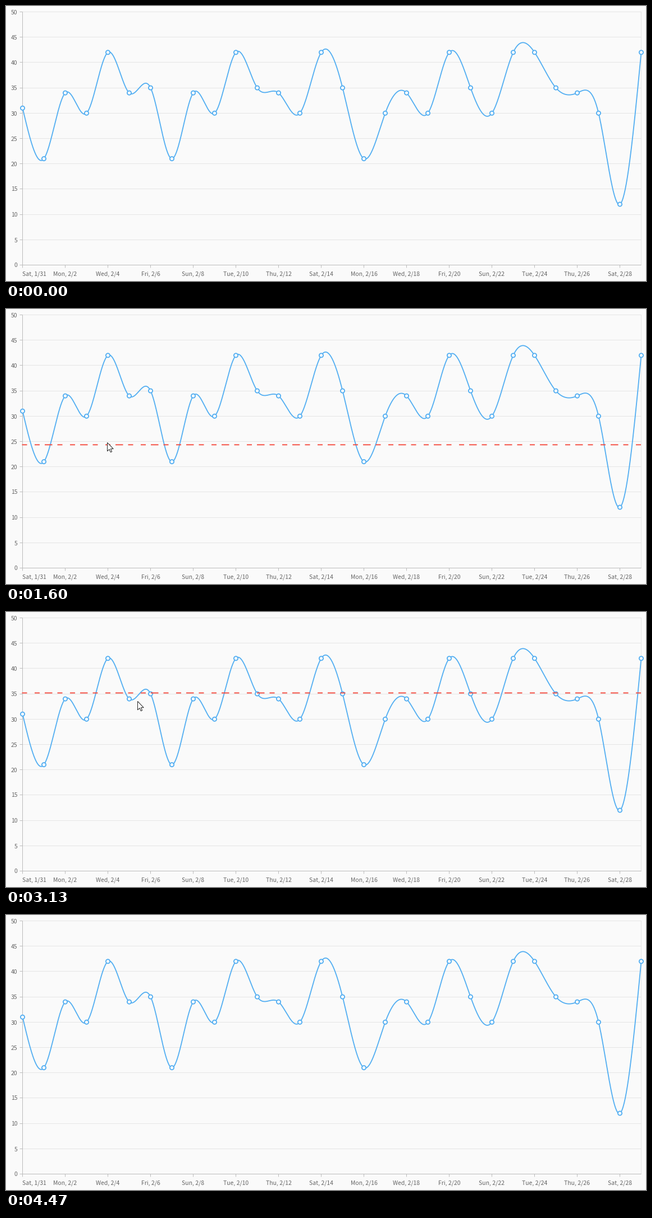
Recreate the animation shown at these times as a matplotlib script. Size 1140 px wide and 491 px high, loop 4790 ms.

```python
import numpy as np
import matplotlib.pyplot as plt
from matplotlib.animation import FuncAnimation

plt.rcParams["path.snap"] = False

W, H, DPI = 1140, 491, 64
PX = 72 / DPI  # points per pixel
FRAMES, LOOP_MS = 72, 4790

LEFT, RIGHT, TOP, BOTTOM = 29.5, 1131.5, 10.5, 462.5
STEP = 38
BG, GRID, AXIS, TEXT = "#fafafa", "#e5e5e5", "#bcbcbc", "#666666"
BLUE, RED = "#52aef2", "#f44336"

# one reading per day
VALUES = np.array([31, 21, 34, 30, 42, 34, 35, 21, 34, 30, 42, 35, 34, 30, 42,
                   35, 21, 30, 34, 30, 42, 35, 30, 42, 42, 35, 34, 30, 12, 42])

# pointer path: frame, x, y; it rises, rests at the top and leaves downwards
ENTER, LEAVE = 8, 67
KEYS = np.array([(8, 42, 484), (16, 102, 393), (24, 180, 238), (32, 226, 132),
                 (39, 250, 50), (41, 250, 50), (44, 246, 80), (47, 234, 159),
                 (49, 230, 235), (57, 186, 394), (66, 62, 482)], float)
DRAG = 0.015  # how far the dashed line trails, per squared speed

ARROW = np.array([(0, 0), (0, 15.4), (3.5, 12), (5.8, 17.2), (8.1, 16.2),
                  (5.9, 11.2), (10.7, 11.2)]) + 0.5


def hermite(t, ts, ps, slopes):
    i = np.clip(np.searchsorted(ts, t, side="right") - 1, 0, len(ts) - 2)
    h = ts[i + 1] - ts[i]
    u = (t - ts[i]) / h
    return ((1 + 2 * u) * (1 - u) ** 2 * ps[i]
            + u * (1 - u) ** 2 * h * slopes[i]
            + u * u * (3 - 2 * u) * ps[i + 1]
            - u * u * (1 - u) * h * slopes[i + 1])


def natural_slopes(ps):
    """Slopes of a natural cubic spline on unit spacing."""
    n = len(ps)
    a = 4 * np.eye(n) + np.eye(n, k=1) + np.eye(n, k=-1)
    a[0, 0] = a[-1, -1] = 2
    padded = np.pad(ps, 1, mode="edge")
    return np.linalg.solve(a, 3 * (padded[2:] - padded[:-2]))


def track(t, ts, ps):
    """Smooth path through the keys that never overshoots them."""
    d = np.diff(ps) / np.diff(ts)
    product = d[:-1] * d[1:]
    total = np.where(product > 0, d[:-1] + d[1:], 1)
    inner = np.where(product > 0, 2 * product / total, 0)
    slopes = np.concatenate([d[:1], inner, d[-1:]])
    return hermite(np.clip(t, ts[0], ts[-1]), ts, ps, slopes)


def to_y(value):
    return BOTTOM - value * (BOTTOM - TOP) / 50


fig = plt.figure(figsize=(W / DPI, H / DPI), dpi=DPI, facecolor=BG)
ax = fig.add_axes([0, 0, 1, 1])
ax.set_xlim(0, W)
ax.set_ylim(H, 0)
ax.axis("off")


def segment(x0, y0, x1, y1, color):
    ax.plot([x0, x1], [y0, y1], color=color, lw=PX,
            solid_capstyle="butt", zorder=1)


def label(x, y, text, align):
    ax.text(x, y, text, ha=align, va="baseline", color=TEXT,
            family="Noto Sans CJK JP", size=10.4 * PX)


# grid, axes and labels
for value in range(0, 51, 5):
    y = np.floor(to_y(value)) + 0.5
    segment(LEFT, y, RIGHT, y, GRID)
    segment(LEFT - 5, y, LEFT, y, AXIS)
    label(20.5, y + 4, str(value), "right")
segment(RIGHT, TOP, RIGHT, BOTTOM, GRID)
segment(LEFT, TOP, LEFT, BOTTOM, AXIS)
segment(LEFT, BOTTOM, RIGHT, BOTTOM, AXIS)

DAYS = ["Sat", "Mon", "Wed", "Fri", "Sun", "Tue", "Thu"]
for i in range(15):
    x = LEFT + 2 * i * STEP
    segment(x, BOTTOM, x, BOTTOM + 5, AXIS)
    date = f"2/{2 * i}" if i else "1/31"
    label(x if i else x - 0.6, 482, f"{DAYS[i % 7]}, {date}",
          "center" if i else "left")

# data series
index = np.arange(len(VALUES))
fine = np.linspace(0, index[-1], 1200)
curve = hermite(fine, index, VALUES, natural_slopes(VALUES))
ax.plot(LEFT + fine * STEP, to_y(curve), color=BLUE, lw=1.8 * PX, zorder=2)
for i, value in enumerate(VALUES):
    ax.add_patch(plt.Circle((LEFT + i * STEP, to_y(value)), 3.6, fc="#fdfdfd",
                            ec=BLUE, lw=1.8 * PX, zorder=3))

# moving parts
marker, = ax.plot([28.5, RIGHT], [0, 0], color=RED, lw=1.8 * PX, zorder=4,
                  ls=(0, (5, 7.5, 5, 5, 7.5, 5)))
pointer = plt.Polygon(ARROW, closed=True, fc="white", ec="#1c1c1c",
                      lw=0.95 * PX, joinstyle="miter", zorder=5)
ax.add_patch(pointer)


def update(k):
    times, xs, ys = KEYS.T
    x, y = track(k, times, xs), track(k, times, ys)
    speed = y - track(k - 1, times, ys)
    line_y = y - DRAG * speed * abs(speed)
    inside = ENTER <= k < LEAVE
    marker.set_ydata([line_y, line_y])
    marker.set_visible(bool(inside and line_y < BOTTOM))
    pointer.set_xy(ARROW + [x, y])
    pointer.set_visible(inside)
    return marker, pointer


anim = FuncAnimation(fig, update, frames=FRAMES, interval=LOOP_MS / FRAMES,
                     repeat=True, repeat_delay=0, blit=False)
plt.show()
```
